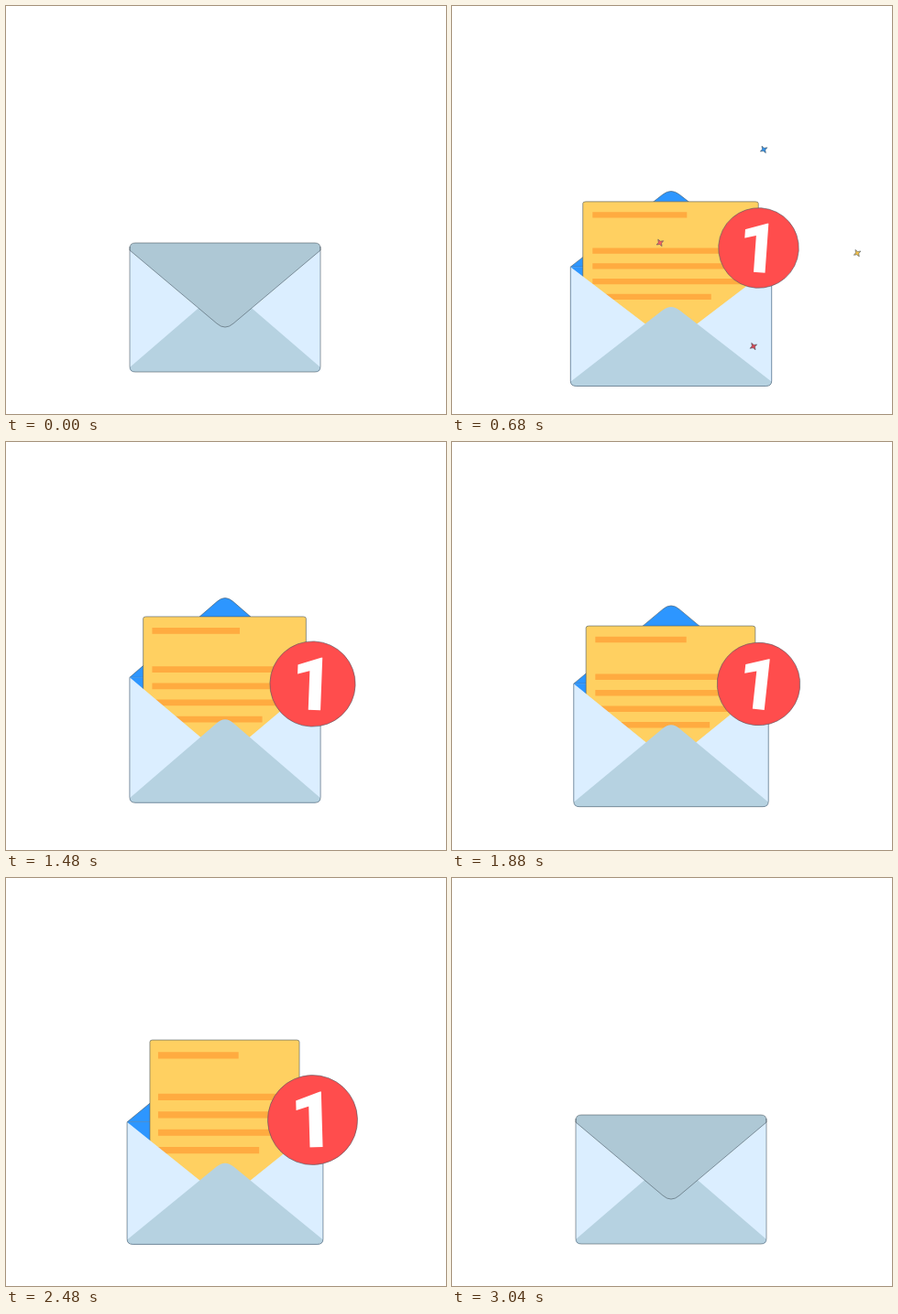
These frames come from a looping animation (480x446 px, 3.36 s). An HTML page:

```html
<!DOCTYPE html>
<html lang="en">
<head>
<meta charset="utf-8">
<title>New mail</title>
<style>
  html, body { margin: 0; width: 100%; height: 100%; overflow: hidden; background: #fff; }
  svg { display: block; width: 100vw; height: 100vh; }
  .edge { stroke: #4a5a64; stroke-width: .6; vector-effect: non-scaling-stroke; }
  #digit { font: 900 80px Roboto, Inter, sans-serif; font-stretch: 75%; }
</style>
</head>
<body>
<svg viewBox="0 0 480 446">
  <defs>
    <clipPath id="inside"><rect id="insideBox" width="480" height="446"/></clipPath>
  </defs>

  <g class="envelope">
    <path id="flapOpen" class="edge" fill="#2d96ff"/>
    <path d="M-104-137H104V-6Q104 0 98 0H-98Q-104 0-104-6Z" fill="#2d96ff"/>
  </g>

  <g clip-path="url(#inside)">
    <g id="letter">
      <rect class="edge" width="145" height="207" rx="2.5" fill="#ffd061"/>
      <path d="M8 18H86M8 67H137M8 88H137M8 109H137M8 130H106M8 179H86" stroke="#ffab40" stroke-width="7.8"/>
    </g>
  </g>

  <g class="envelope">
    <path d="M-104-137L0-49 104-137V-6Q104 0 98 0H-98Q-104 0-104-6Z" fill="#dbeeff"/>
    <path d="M-104-5L-9-87Q0-95 9-87L104-5Q103 0 98 0H-98Q-103 0-104-5Z" fill="#b6d2e1"/>
    <path id="flapShut" class="edge" fill="#aec8d5"/>
    <path class="edge" d="M-104-137V-6Q-104 0-98 0H98Q104 0 104-6V-137" fill="none"/>
  </g>

  <g id="stars"></g>

  <g id="badge">
    <circle class="edge" r="46" fill="#ff4d4d"/>
    <text id="digit" y="28" text-anchor="middle" fill="#fff">1</text>
  </g>
</svg>
<script>
const LOOP = 3360, STEP = 40;
const CENTER = { x: 334.5, y: 264.5 };
const $ = id => document.getElementById(id);
const set = (el, attrs) => { for (const k in attrs) el.setAttribute(k, attrs[k]); };
const show = on => on ? 'visible' : 'hidden';

const mix = (a, b, p) => a + (b - a) * p;
const wave = p => (1 - Math.cos(Math.PI * p)) / 2;
const ramp = (t, from, to) => wave(Math.min(1, Math.max(0, (t - from) / (to - from))));

// y: envelope bottom, sx: its stretch, top and w: letter, r and turn: badge
const rest   = { y: 400,   sx: 1,     top: 179, w: 162,   r: 49, turn: 0 };
const crouch = { ...rest, y: 407, sx: 1.058 };
const leap   = { y: 339,   sx: .889,  top: 17,  w: 143,   r: 55, turn: 5 };
const land   = { y: 421,   sx: 1.067, top: 228, w: 195,   r: 43, turn: 4 };
const high   = { y: 386.5, sx: .965,  top: 173, w: 165.5, r: 49, turn: -5 };
const low    = { y: 399.5, sx: 1.025, top: 203, w: 186,   r: 45, turn: 7 };

const score = [[0, rest], [191, crouch], [455, leap], [725, land], [1095, high], [1780, low],
  [2390, high], [2536, crouch], [2800, leap], [3040, rest], [LOOP, rest]];

function poseAt(t) {
  const i = score.findIndex(([time]) => time > t);
  const [t0, a] = score[i - 1], [t1, b] = score[i];
  const p = ramp(t, t0, t1), pose = {};
  for (const k in a) pose[k] = mix(a[k], b[k], p);
  return pose;
}

// Below 0 the flap hangs in front, above 0 it stands up behind
function flapPath(open) {
  const root = open > 0 ? -137 : -133;
  const rise = open * (open > 0 ? 91 : 88);
  const shoulder = root - rise * .91;
  const rim = open > 0 ? 'Z' : 'V-135Q104-141 98-141H-98Q-104-141-104-135Z';
  return `M-104 ${root}L-9 ${shoulder}Q0 ${root - rise} 9 ${shoulder}L104 ${root}${rim}`;
}

const stars = ['#f3c04a', '#d84452', '#ff5c5c', '#2f8fe8'].map((fill, i) => {
  const el = document.createElementNS('http://www.w3.org/2000/svg', 'path');
  set(el, { d: 'M0-1L.28-.28 1 0 .28.28 0 1-.28.28-1 0-.28-.28Z', fill, class: 'edge' });
  $('stars').append(el);
  return { el, angle: (i * 90 + 3) * Math.PI / 180 };
});

function drawStars(t) {
  const distance = 118 * (1 - Math.exp((245 - t) / 178));
  const size = 7.5 * Math.min(1, (1060 - t) / 660);
  for (const { el, angle } of stars) {
    const x = CENTER.x + distance * Math.cos(angle);
    const y = CENTER.y + distance * Math.sin(angle);
    set(el, {
      transform: `translate(${x} ${y}) rotate(${18 + (t - 400) * .15}) scale(${size})`,
      visibility: show(t > 245 && t < 1060)
    });
  }
}

function draw(t) {
  const { y, sx, top, w, r, turn } = poseAt(t);

  const sy = 1 + .88 * (1 - sx);
  for (const el of document.querySelectorAll('.envelope'))
    set(el, { transform: `translate(239 ${y}) scale(${sx} ${sy})` });

  const open = -1 + 1.25 * ramp(t, 140, 340) + .75 * ramp(t, 400, 540) - 2 * ramp(t, 2840, 3040);
  set($('flapOpen'), { d: flapPath(open), visibility: show(open > 0) });
  set($('flapShut'), { d: flapPath(open), visibility: show(open <= 0) });

  const out = ramp(t, 240, 370) - ramp(t, 2820, 2960);
  const h = 209 - .93 * (w - 145);
  set($('insideBox'), { height: y - 8 });
  set($('letter'), {
    transform: `translate(${238.5 - w / 2} ${mix(285, top, out)}) scale(${w / 145} ${h / 207})`,
    visibility: show(out > 0)
  });

  const grown = ramp(t, 240, 400) - ramp(t, 2630, 2795);
  set($('badge'), {
    transform: `translate(${CENTER.x} ${CENTER.y}) rotate(${turn - 240 * (1 - grown)}) scale(${r / 46 * grown})`,
    visibility: show(grown > 0)
  });

  drawStars(t);
}

function tick() {
  const t = performance.now() % LOOP;
  draw(Math.floor(t / STEP) * STEP);
  requestAnimationFrame(tick);
}
tick();
</script>
</body>
</html>
```
